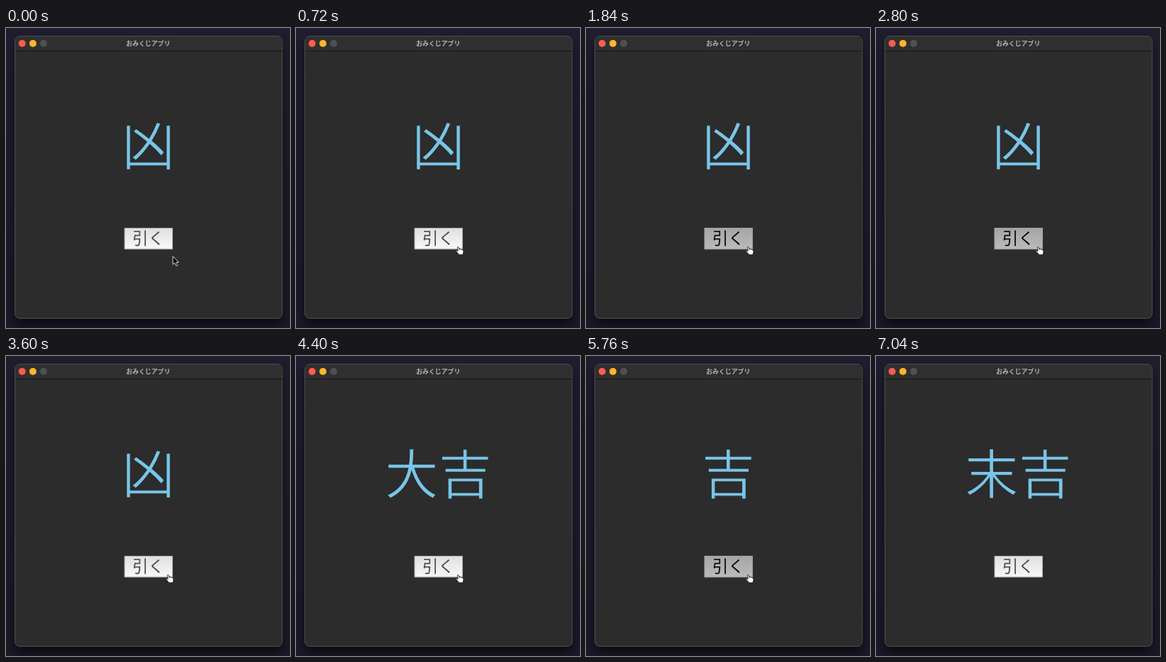
An HTML page for the animation above (7120 ms loop, 400 by 422 pixels).

```html
<!DOCTYPE html>
<html lang="ja">
<head>
<meta charset="utf-8">
<style>
  html, body { margin: 0; width: 100%; height: 100%; overflow: hidden; background: #1c1b2a; }
  svg { display: block; width: 400px; height: 422px; }
  text { font-family: "Noto Sans CJK JP", "Noto Sans CJK", sans-serif; text-anchor: middle; }
  /* The outline in the window colour slims the strokes of the glyphs. */
  #result { font-size: 75.5px; font-weight: 350; fill: #78c5e7; stroke: #2c2c2c; stroke-width: 1.3; }
  #label { font-size: 22.3px; fill: #484848; }
  #title { font-size: 8.9px; font-weight: 700; fill: #b4b4b4; }
  #button { fill: url(#idle); stroke: #a4a4a4; }
  .pressed #button { fill: url(#down); stroke: #a0a0a0; }
  .pressed #label { fill: #000; }
</style>
</head>
<body>
<svg viewBox="0 0 400 422">
  <defs>
    <linearGradient id="desk" x2="0" y2="1">
      <stop stop-color="#1f1e2f"/><stop offset="1" stop-color="#1b1a29"/>
    </linearGradient>
    <linearGradient id="idle" x2="0" y2="1">
      <stop stop-color="#e0e0e0"/><stop offset="1" stop-color="#f8f8f8"/>
    </linearGradient>
    <linearGradient id="down" x2="0" y2="1">
      <stop stop-color="#a5a5a5"/><stop offset="1" stop-color="#bababa"/>
    </linearGradient>
    <filter id="blur" x="-20%" y="-20%" width="140%" height="140%">
      <feGaussianBlur stdDeviation="8"/>
    </filter>
  </defs>

  <rect width="400" height="422" fill="url(#desk)"/>
  <rect x="12" y="21" width="377" height="397" rx="9" opacity=".6" filter="url(#blur)"/>
  <rect x="12.5" y="11.5" width="376.5" height="397" rx="7" fill="#2c2c2c" stroke="#505052"/>
  <path d="M13 32V18.5Q13 12 19.5 12H382Q388.5 12 388.5 18.5V32Z" fill="#2f2f2f"/>
  <path d="M13 32.5H389" stroke="#171717"/>
  <circle cx="22.7" cy="21.7" r="5" fill="#ff5a50"/>
  <circle cx="37.9" cy="21.7" r="5" fill="#fdb52b"/>
  <circle cx="53" cy="21.7" r="5" fill="#505050"/>
  <text id="title" x="200.3" y="24.8">おみくじアプリ</text>

  <text id="result" x="200.5" y="194.3"></text>
  <g id="control">
    <rect id="button" x="167" y="281.5" width="67.5" height="29.5"/>
    <text id="label" x="200.4" y="304.3">引く</text>
  </g>

  <path id="arrow" d="M0 0V11.6L2.7 9.2L4.6 13.6L6.7 12.7L4.9 8.4H8.2Z"
        fill="#000" stroke="#eee" stroke-width=".9" stroke-linejoin="round"/>
  <path id="hand" d="M0 .8Q.8-.5 1.8.8L2.9 4.2Q4-.0 5.1 4.2Q6.2 3 7 4.8Q8.4 4 8.6 5.8V8.2L7.6 11.3H2.5L-.8 7.5Q-2.2 5.3-.6 5.2L1 6.4Z"
        fill="#fff" stroke="#111" stroke-width=".8" stroke-linejoin="round"/>
</svg>
<script>
const LOOP = 7120, STEP = 80, PRESS_LENGTH = 160;
const presses = [1760, 2800, 3840, 4880, 5680];
const results = ["凶", "凶", "凶", "大吉", "吉", "末吉"];
const ARRIVE = [160, 560], LEAVE = [6480, 6640];

const [result, control, arrow, hand] =
  ["result", "control", "arrow", "hand"].map(id => document.getElementById(id));

const mix = (a, b, p) => a + (b - a) * p;
const progress = (t, [from, to]) => {
  const p = Math.min(1, Math.max(0, (t - from) / (to - from)));
  return p * p * (3 - 2 * p);
};

function place(node, x, y, visible) {
  node.setAttribute("transform", `translate(${x} ${y})`);
  node.style.display = visible ? "" : "none";
}

function draw(t) {
  const drawn = presses.filter(start => t >= start + PRESS_LENGTH).length;
  result.textContent = results[drawn];
  control.classList.toggle("pressed",
    presses.some(start => t >= start && t < start + PRESS_LENGTH));

  const arrive = progress(t, ARRIVE), leave = progress(t, LEAVE);
  const x = mix(mix(235, 227.2, arrive), 249, leave);
  const y = mix(mix(321, 307.6, arrive), 304, leave);
  const overButton = x < 235 && y < 311;
  place(arrow, x, y, !overButton && t < LEAVE[1]);
  place(hand, x, y, overButton && t < LEAVE[1]);
}

function tick() {
  const t = performance.now() % LOOP;
  draw(Math.floor(t / STEP) * STEP);
  requestAnimationFrame(tick);
}
tick();
</script>
</body>
</html>
```
